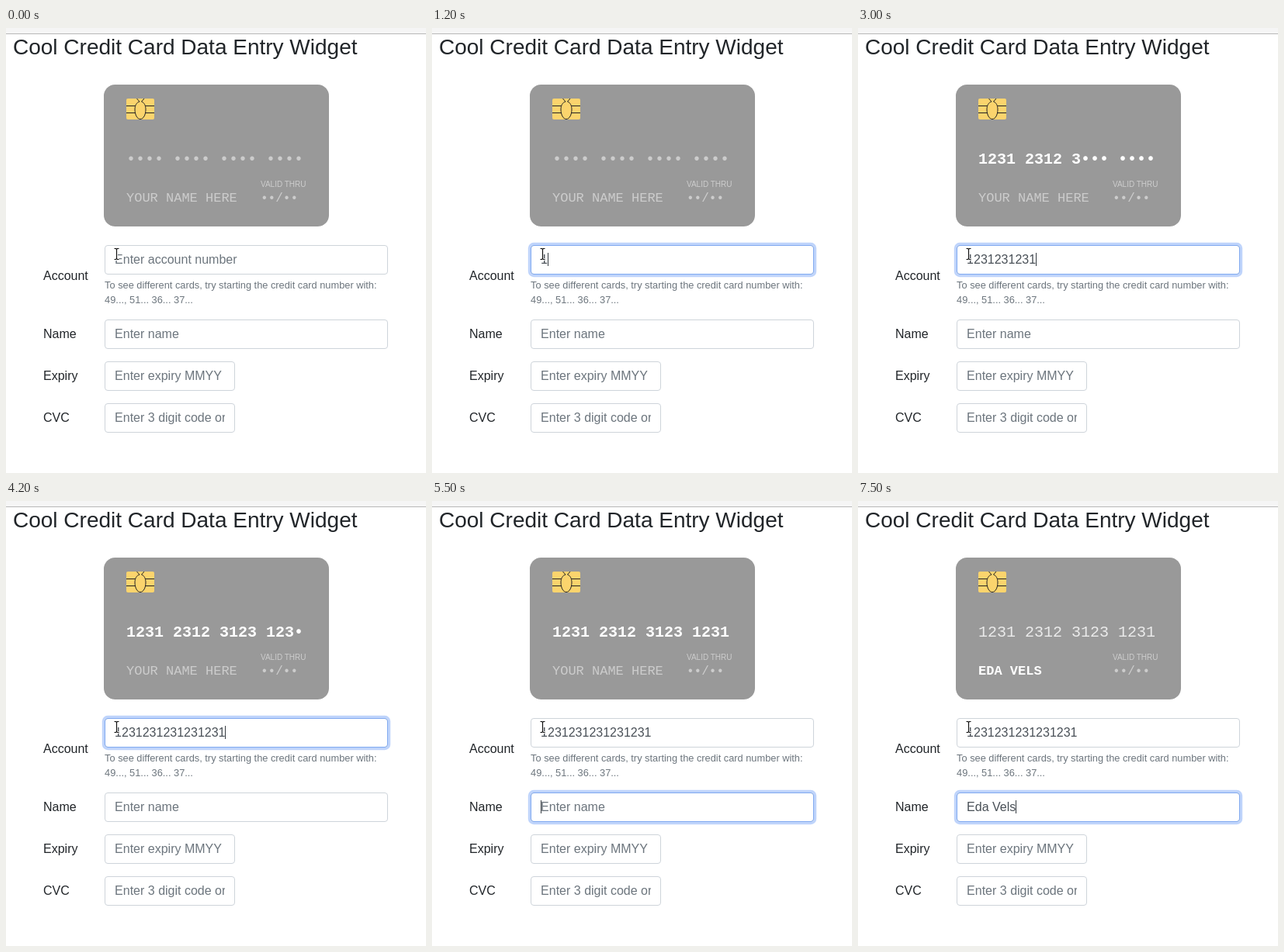
These frames come from a looping animation (541 by 574 pixels, 8000 ms). An HTML page:

```html
<!DOCTYPE html>
<html lang="en">
<head>
<meta charset="utf-8">
<title>Card entry</title>
<style>
  html, body { margin: 0; width: 100%; height: 100%; overflow: hidden; background: #fff; }
  body { position: relative; font: 16px/24px "Liberation Sans", Arial, sans-serif; color: #212529; }
  .bar { position: absolute; left: 0; top: 0; width: 100%; height: 7px; background: #f5f5f5; border-bottom: 1px solid #b8b8b8; }
  h1 { position: absolute; left: 9px; top: 8px; margin: 0; font-size: 28px; font-weight: 400; line-height: 33.6px; white-space: nowrap; }
  label { position: absolute; left: 48px; }
  small { position: absolute; left: 127.1px; top: 322px; font-size: 12.8px; line-height: 19.2px; color: #6c757d; white-space: nowrap; }
  .field { position: absolute; left: 127.1px; box-sizing: border-box; height: 38px; padding: 6px 12px; border: 1px solid #ced4da; border-radius: 4px; background: #fff; }
  .field::after { content: ""; position: absolute; inset: -1px; border: 1px solid #80a9f0; border-radius: 4px; box-shadow: 0 0 0 3.2px #bfd4fb; opacity: var(--on, 0); }
  .clip { height: 24px; overflow: hidden; white-space: pre; }
  .text { position: relative; color: #495057; }
  .text.hint { color: #6c757d; }
  .caret { position: absolute; left: 0; top: 0; width: 1px; height: 17px; background: #343a40; visibility: hidden; }
  svg { position: absolute; left: 0; top: 0; }
  .mono { font-family: "Liberation Mono", "Courier New", monospace; }
</style>
</head>
<body>
<div class="bar"></div>
<h1>Cool Credit Card Data Entry Widget</h1>
<small>To see different cards, try starting the credit card number with:<br>49..., 51... 36... 37...</small>
<svg width="541" height="574">
  <rect x="126" y="73" width="290" height="182.9" rx="14.5" fill="#999"/>
  <rect x="155" y="91" width="36" height="27" rx="2" fill="#fbd46d"/>
  <g fill="none" stroke="#222">
    <path d="M155 100.5H166.5M155 109.5H166.5M191 100.5H179.5M191 109.5H179.5"/>
    <path d="M168.5 91L172 95C168 96 166 100 166 105C166 112 169 117.5 173 117.5C177 117.5 180 112 180 105C180 100 178 96 174.5 95L178 91"/>
  </g>
  <g fill="#fff">
    <text id="num" class="mono" x="155" y="175" font-size="20"></text>
    <text id="who" class="mono" x="155" y="224" font-size="17"></text>
    <text x="328" y="205" font-size="10" opacity=".5">VALID THRU</text>
    <text class="mono" x="328" y="224" font-size="16" opacity=".5">••/••</text>
  </g>
</svg>
<script>
const LOOP = 8000, STEP = 100;
const FOCUS = 700, TAB = 5300;
const number = { text: "123".repeat(5) + "1", first: 1200, last: 4200, rush: 170 };
const holder = { text: "Eda Vels", first: 6200, last: 7500, rush: 0 };

// Evenly spaced keys, with the middle of the run slightly ahead.
function keyTime({ text, first, last, rush }, k) {
  const p = k / (text.length - 1);
  return first + (last - first) * p - rush * Math.sin(Math.PI * p);
}

// What is visible at t; a lag of 1 trails one key behind.
function typed(run, t, lag = 0) {
  let n = 0;
  while (n < run.text.length && t >= keyTime(run, n + lag)) n++;
  return run.text.slice(0, n);
}

const ramp = (t, a, b) => Math.min(1, Math.max(0, (t - a) / (b - a)));

function addField(label, top, width, hint, labelTop = top + 7) {
  const tag = document.createElement("label");
  tag.textContent = label;
  tag.style.top = labelTop + "px";
  const box = document.createElement("div");
  box.className = "field";
  box.style.top = top + "px";
  box.style.width = width + "px";
  box.innerHTML = '<div class="clip"><span class="text"><span></span><i class="caret"></i></span></div>';
  document.body.append(tag, box);
  const text = box.querySelector(".text"), value = text.firstChild, caret = text.lastChild;
  const show = (entry, focus, blink) => {
    value.textContent = entry || hint;
    text.classList.toggle("hint", !entry);
    caret.style.left = entry ? "100%" : "0";
    caret.style.visibility = blink ? "visible" : "hidden";
    box.style.setProperty("--on", focus);
  };
  show("", 0, false);
  return show;
}

const showNumber = addField("Account", 280, 365.4, "Enter account number", 308);
const showHolder = addField("Name", 376.4, 365.4, "Enter name");
addField("Expiry", 430.4, 167.7, "Enter expiry MMYY");
addField("CVC", 484.4, 167.7, "Enter 3 digit code or 4");

document.body.insertAdjacentHTML("beforeend", `
<svg width="541" height="574" fill="none">
  <path id="beam" d="M139.5 284.5H141.5L142.5 285.5L143.5 284.5H145.5M142.5 285V298M139.5 298.5H141.5L142.5 297.5L143.5 298.5H145.5"/>
  <use href="#beam" stroke="#fff" stroke-width="3"/>
  <use href="#beam" stroke="#111" stroke-width="1.2"/>
</svg>`);

const num = document.getElementById("num"), who = document.getElementById("who");

function print(node, text, opacity, bold) {
  node.textContent = text;
  node.setAttribute("opacity", opacity);
  node.setAttribute("font-weight", bold ? 700 : 400);
}

function draw(t) {
  const tab = ramp(t, TAB - 100, TAB + 200);
  showNumber(typed(number, t), ramp(t, FOCUS - 100, FOCUS + 100) - tab, t >= FOCUS && t < number.last + 600);
  showHolder(typed(holder, t), tab, t >= TAB && t < TAB + 600 || t >= holder.first);

  const digits = typed(number, t, 1), name = typed(holder, t);
  const lit = ramp(t, 1300, 1500), handed = ramp(t, holder.first, holder.first + 300);
  print(num, digits.padEnd(16, "•").match(/.{4}/g).join(" "),
    .5 + .5 * lit - .2 * handed, lit > 0 && !name);
  print(who, name.toUpperCase() || "YOUR NAME HERE", .5 + .5 * handed, name);
}

let start, last = -1;
function tick(now) {
  start ??= now;
  const t = Math.floor((now - start) % LOOP / STEP) * STEP;
  if (t !== last) draw(last = t);
  requestAnimationFrame(tick);
}
draw(0);
requestAnimationFrame(tick);
</script>
</body>
</html>
```
